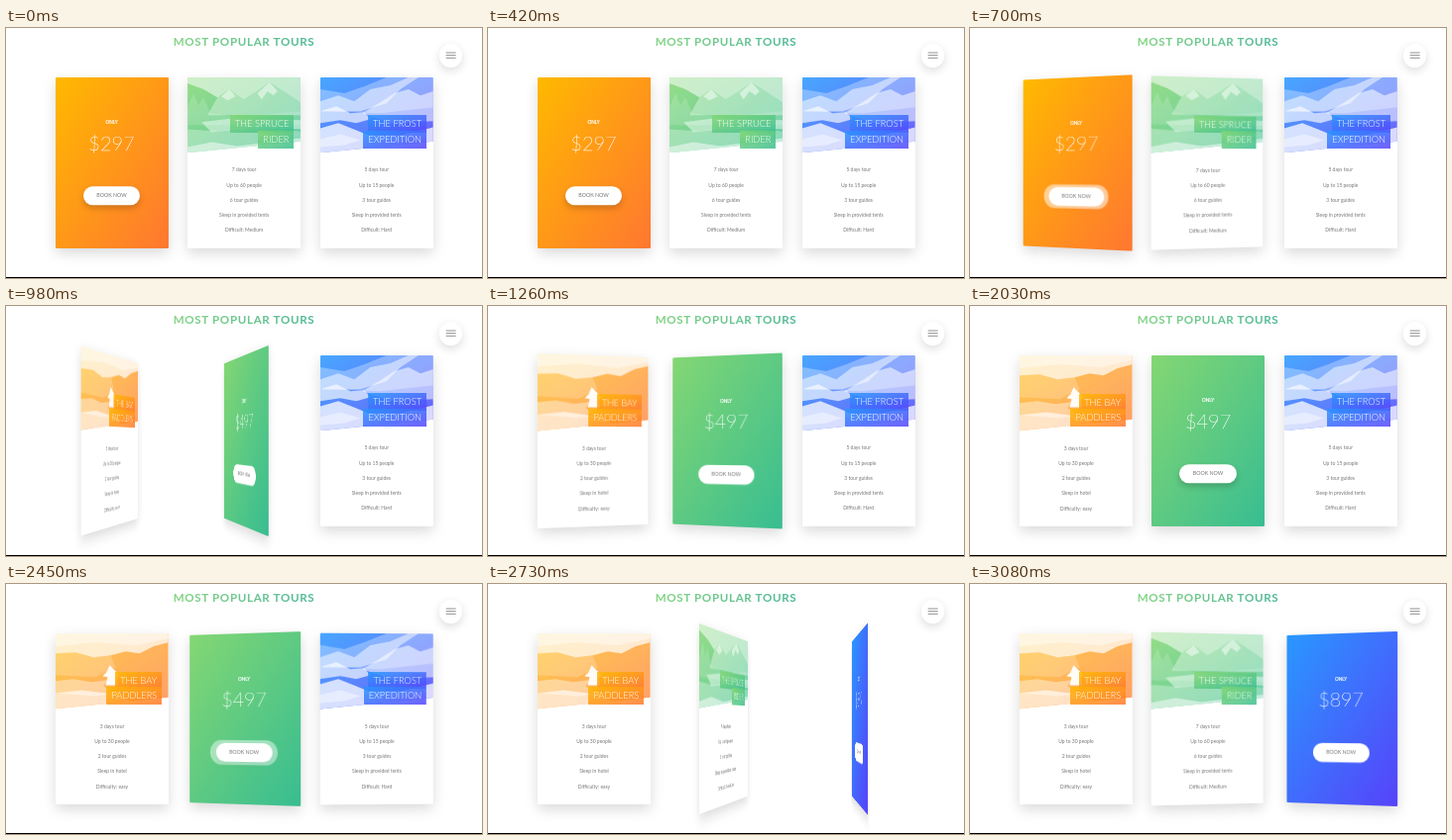
These frames come from a looping animation (480x253 px, 3150 ms). An HTML page:

```html
<!DOCTYPE html>
<html lang="en">
<head>
<meta charset="utf-8">
<title>Most popular tours</title>
<style>
  * { margin: 0; padding: 0; box-sizing: border-box; }
  html { font-size: 3.33px; }
  html, body { width: 100%; height: 100%; overflow: hidden; }
  body { position: relative; background: #fff; color: #777; font: 400 1.6rem/1.7 Lato, sans-serif; }
  .floor { position: absolute; left: 0; top: 252px; width: 480px; height: 1px; background: #000; }
  h2 {
    position: absolute; left: 240px; top: 3.5px; transform: translateX(-50%); white-space: nowrap;
    font-size: 3.48rem; font-weight: 700; letter-spacing: .2rem; text-transform: uppercase;
    background: linear-gradient(to right, #85d585, #50b898); -webkit-background-clip: text;
    background-clip: text; color: transparent;
  }
  .menu {
    position: absolute; left: 436.8px; top: 16.4px; width: 7rem; height: 7rem; border-radius: 50%;
    background: #fff; box-shadow: 0 1rem 3rem rgba(0, 0, 0, .14);
  }
  .menu svg { display: block; width: 100%; height: 100%; }

  .card { position: absolute; top: 49.7px; width: 114px; height: 52rem; perspective: 150rem; }
  .side {
    position: absolute; inset: 0; overflow: hidden; border-radius: 1px; backface-visibility: hidden;
    background: #fff; box-shadow: 0 1.5rem 4rem rgba(0, 0, 0, .15);
  }
  .back, .picture { background: linear-gradient(to right bottom, var(--from), var(--to)); }
  .picture { height: 23rem; clip-path: polygon(0 0, 100% 0, 100% 85%, 0 100%); }
  .picture svg { display: block; width: 100%; height: 100%; }
  h4 {
    position: absolute; top: 12rem; right: 2rem; text-align: right; white-space: nowrap;
    font-size: 2.8rem; font-weight: 300; text-transform: uppercase; color: #fff;
  }
  h4 span {
    padding: 1rem 1.5rem; -webkit-box-decoration-break: clone; box-decoration-break: clone;
    background: linear-gradient(to right bottom, var(--from-soft), var(--to-soft));
  }
  ul { padding-top: 3rem; list-style: none; text-align: center; font-size: 1.5rem; }
  li { height: 15.3px; line-height: 15.3px; }

  .offer { position: absolute; top: 50%; width: 100%; transform: translateY(-50%); text-align: center; color: #fff; }
  .only { font-size: 1.4rem; text-transform: uppercase; -webkit-text-stroke: .2px #fff; }
  .price { margin-bottom: 8rem; font-size: 6rem; font-weight: 100; -webkit-text-stroke: .25px #fff; }
  .button { position: relative; display: inline-block; vertical-align: top; color: #777; }
  .button b { position: relative; display: block; padding: 1.5rem 4rem; border-radius: 10rem; background: #fff; font-weight: 400; }
  .button i { position: absolute; inset: 0; border-radius: 10rem; background: #fff; }
</style>
</head>
<body>
<h2>Most popular tours</h2>
<div class="menu">
  <svg viewBox="0 0 70 70"><path d="M20 27h30M20 35h30M20 43h30" stroke="#666" stroke-width="2.2"/></svg>
</div>
<div class="floor"></div>

<script>
const LOOP = 3150, FLIP = 950, LIFT = 240, RING = 480;

// Landscapes: [white opacity, path] on a 113 x 76 field
const sea = [
  [.28, 'M0 0H113V76H0Z'],
  [.72, 'M0 0H113V9L98 13 84 20 70 18 55 22 38 24 20 19 0 20Z'],
  [.4, 'M0 0H113V5L80 12 40 9 0 13Z'],
  [.2, 'M0 20L20 19 38 24 55 22 60 34 40 44 0 42Z'],
  [.4, 'M0 48L18 46 36 49 52 47 48 53 60 60 40 63 0 60Z'],
  [.65, 'M0 60L26 57 58 61 80 70 113 65V76H0Z'],
  [.95, 'M54 32l5 5 5 5-3 3 2 7H50l2-8-5-1 4-4Z']
];
const forest = [
  [.15, 'M0 0H113V76H0Z'],
  [.55, 'M0 0H113V25L96 14 82 5 68 15 56 22 42 12 30 20 16 12 0 6Z'],
  [.35, 'M42 12L56 22 68 15 82 5 96 14 113 25V38H20L30 20Z'],
  [.5, 'M82 5L90 14 86 18 80 14 74 22 70 16ZM42 12l6 7-8 4-6-4Z'],
  [.15, 'M0 30l6-14 5 12 5-8 7 16 30 4 60-6V48H0Z'],
  [.45, 'M14 45L46 41 113 43V52L60 51 24 55Z'],
  [.3, 'M0 52L30 54 60 50 113 54V66L0 76Z'],
  [.5, 'M0 70L24 65 50 69 113 61V65L0 76Z']
];
const snow = [
  [.14, 'M0 0H113V76H0Z'],
  [.3, 'M0 12L24 16 44 9 66 0H113V30L60 36 0 34Z'],
  [.5, 'M0 24L18 18 34 24 50 12 70 8 88 0H98L80 12 66 26 40 34 0 34Z'],
  [.55, 'M42 36L60 25 74 16 88 12 100 18 113 14V44L70 46Z'],
  [.65, 'M0 34L16 29 30 36 44 35 50 42 36 46 20 43 0 46Z'],
  [.75, 'M0 51L18 46 36 53 48 58 80 58 113 50V66L0 76Z'],
  [.4, 'M0 62L20 57 40 63 24 68 0 70Z']
];

const cards = [
  { colors: ['255,185,0', '255,119,48'], scene: sea, name: ['The Bay', 'Paddlers'], price: 297,
    facts: ['3 days tour', 'Up to 30 people', '2 tour guides', 'Sleep in hotel', 'Difficulty: easy'],
    flip: [-FLIP, 612], hover: [-RING, 550] },
  { colors: ['132,215,115', '56,189,145'], scene: forest, name: ['The Spruce', 'Rider'], price: 497,
    facts: ['7 days tour', 'Up to 60 people', '6 tour guides', 'Sleep in provided tents', 'Difficult: Medium'],
    flip: [636, 2379], hover: [1500, 2320] },
  { colors: ['41,152,255', '86,67,250'], scene: snow, name: ['The Frost', 'Expedition'], price: 897,
    facts: ['5 days tour', 'Up to 15 people', '3 tour guides', 'Sleep in provided tents', 'Difficult: Hard'],
    flip: [2430, LOOP * 2], hover: [LOOP * 2, LOOP * 3] }
];

cards.forEach((card, i) => {
  const el = document.createElement('div');
  const [from, to] = card.colors;
  el.className = 'card';
  el.style.cssText = `left:${49.5 + i * 133.6}px;--from:rgb(${from});--to:rgb(${to});` +
    `--from-soft:rgba(${from},.85);--to-soft:rgba(${to},.85)`;
  el.innerHTML = `
    <div class="side front">
      <div class="picture"><svg viewBox="0 0 113 76" preserveAspectRatio="none">
        ${card.scene.map(([o, d]) => `<path d="${d}" fill="#fff" opacity="${o}"/>`).join('')}
      </svg></div>
      <h4><span>${card.name.join('<br>')}</span></h4>
      <ul>${card.facts.map(f => `<li>${f}</li>`).join('')}</ul>
    </div>
    <div class="side back"><div class="offer">
      <p class="only">Only</p><p class="price">$${card.price}</p>
      <div class="button"><i></i><b>BOOK NOW</b></div>
    </div></div>`;
  document.body.append(el);
  for (const part of ['.front', '.back', '.button', 'b', 'i']) card[part] = el.querySelector(part).style;
});

// CSS "ease": cubic-bezier(.25, .1, .25, 1)
function ease(x) {
  if (x <= 0) return 0;
  if (x >= 1) return 1;
  let lo = 0, hi = 1, s;
  for (let n = 0; n < 24; n++) {
    s = (lo + hi) / 2;
    if (.75 * s * (1 - s) + s ** 3 < x) lo = s; else hi = s;
  }
  return .3 * s * (1 - s) ** 2 + 3 * s * s * (1 - s) + s ** 3;
}

const inOut = (t, [start, end], length) => ease((t - start) / length) - ease((t - end) / length);

function draw(now) {
  const t = now % LOOP;
  for (const card of cards) {
    const angle = 180 * inOut(t, card.flip, FLIP);
    const lift = inOut(t, card.hover, LIFT);
    const ring = inOut(t, card.hover, RING);
    card['.front'].transform = `rotateY(${angle}deg)`;
    card['.back'].transform = `rotateY(${angle - 180}deg)`;
    card['.button'].transform = `translateY(${-lift}px)`;
    card.b.boxShadow = `0 1rem 2rem rgba(0,0,0,${.2 * lift})`;
    card.i.transform = `scale(${1 + .4 * ring}, ${1 + .6 * ring})`;
    card.i.opacity = 1 - ring;
  }
  requestAnimationFrame(draw);
}
requestAnimationFrame(draw);
</script>
</body>
</html>
```
